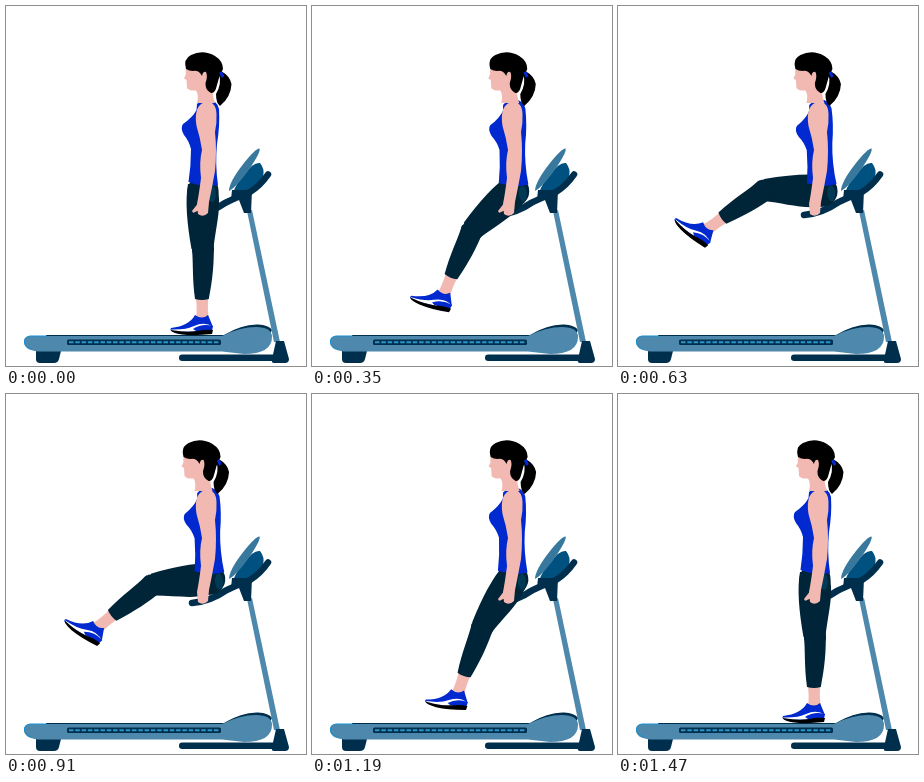
An HTML page that plays this animation: 300 px wide and 360 px high, repeating every 1.54 s.

```html
<!DOCTYPE html>
<html lang="en">
<head>
<meta charset="utf-8">
<title>Leg raise</title>
<style>
  html, body { margin: 0; width: 100%; height: 100%; overflow: hidden; background: #fff; }
  svg { display: block; width: 100vw; height: 100vh; }
  .skin { fill: #f1b9b1; }
  .pants { fill: #002438; }
  .blue { fill: #0029cf; }
  .dark { fill: #002f4d; }
  .steel { fill: #4e89ad; }
</style>
</head>
<body>
<svg viewBox="0 0 300 360">
  <!-- treadmill -->
  <g>
    <path class="dark" d="M30 345H55L53 353Q52 357 48 357H34Q30 357 30 353Z"/>
    <path class="dark" d="M40 329H218Q236 318 252 318.500Q263 319 266 324L262 332H40Z"/>
    <path class="steel" d="M24 330H216Q234 321 250 321Q266 321 266 331Q266 348 238 348L216 345.500H32Q18 344 18 336Q18 330 24 330Z"/>
    <path d="M41 330H24Q18 331 18.500 336Q19 341 26 343" fill="none" stroke="#168fce" stroke-width="1"/>
    <rect class="dark" x="61" y="333.500" width="154" height="5.500" rx="1.500"/>
    <path d="M63 336.300H214" stroke="#2b94c9" stroke-width="2" stroke-dasharray="4.500 1.800"/>
    <rect class="dark" x="173" y="348.500" width="100" height="6.500" rx="3.200"/>
    <path class="steel" d="M241 205L246 204L274 336H268Z"/>
    <path class="dark" d="M270 335H278L283 353Q283 357 279 357H268Q265 357 266 353Z"/>
    <path d="M227 187Q230 177 239 168Q247 156 254 157Q259 163 257 171L244 188Z" fill="#005080"/>
    <path class="dark" d="M226 184H246L245 207H238L233 194H225Z"/>
    <path d="M186 209Q205 207 219 197Q229 192 244 186Q254 180 262 168.500" fill="none" stroke="#002f4d" stroke-width="6.500" stroke-linecap="round"/>
    <path d="M223 185Q223 176 238 157Q250 142 253.500 142.500Q255 145 246 159Q232 180 223 185Z" fill="#38789d"/>
  </g>

  <g id="body">
    <g id="thigh">
      <circle class="pants" r="15.500"/>
      <path class="pants" d="M-15 -7C-18 10 -16 32 -11.500 58H10.500C12 40 18 20 15.500 2L14 -7Z"/>
      <g id="shin">
        <path class="skin" d="M-7.500 46H5.500Q4 60 6 70H-7Q-5.500 60 -7.500 46Z"/>
        <circle class="pants" r="11"/>
        <path class="pants" d="M-11.200 -2C-9.500 14 -11 28 -8 50Q-1 52 5.800 50C8 38 11 22 10.800 0Z"/>
        <g id="shoe">
          <path class="blue" d="M-31 10Q-13 8 -7 -3Q0 2 6 -3L11 9Q11 13 4 14L-28 14Q-33 13 -31 10Z"/>
          <path d="M-31 11.500Q-16 12 -8 8Q3 3 11 9V13L-28 14Z" fill="#fff"/>
          <path class="blue" d="M-9 11Q0 5 11 8L10 13H-6Z"/>
          <path d="M-31 12Q-15 15 -5 13Q4 11 11 12L10 16Q-8 18 -20 16.500Q-30 15 -31 12Z"/>
        </g>
      </g>
    </g>
    <ellipse cx="206" cy="188" rx="4" ry="8" fill="#003a55"/>
    <path class="blue" d="M191 98Q196 93.500 202 93.500Q211 94 213 103Q214 120 211 138Q209 158 212 179Q198 182 182.500 176Q185 160 185 143Q183 135 178 129Q174 122 177 118Q187 111 190.500 104Z"/>
  </g>

  <g id="head">
    <path d="M215 65Q224 70 225.500 78Q225 91 214 100Q210 97 210 88Q216 78 213 68Z"/>
    <path class="skin" d="M181 60Q179 66 180 68L178 72.500L180.500 74L181 82Q183 85 190 84.500Q193 89 191 97H209Q206 89 207 84L204 60Z"/>
    <path d="M180 63Q177 53 185 49Q197 43 209 50Q217 55 217 63Q213 70 211 79Q209 88 205 87Q199 84 199.500 77Q202 70 200 66Q197 65 196 70Q193 64 187 65Q183 65 180 63Z"/>
    <path d="M214.500 66L217 71" stroke="#0029cf" stroke-width="3"/>
  </g>

  <!-- arm -->
  <path class="skin" d="M201 95.500Q210 96 210.500 108Q211 117 209 126Q211 145 209 165Q206 182 203 196L202 207Q197 212 192 208L191 198Q193 188 195 172Q193 156 196 144Q194 131 190.500 120Q187 98 201 95.500Z"/>
  <path id="thumb" class="skin" d="M193 196L186 205Q187 208 189 206L194 204Z"/>
</svg>
<script>
  const STEP = 70, STEPS = 22;
  const [body, thigh, shin, shoe, head, thumb] =
    ["body", "thigh", "shin", "shoe", "head", "thumb"].map(id => document.getElementById(id));

  const place = (part, x, y, angle) =>
    part.setAttribute("transform", `translate(${x} ${y}) rotate(${angle})`);

  function draw() {
    const step = Math.floor(performance.now() / STEP) % STEPS;
    const rising = step <= 10;
    const phase = rising ? step : STEPS - 1 - step;
    const lift = (1 - Math.cos(Math.PI * phase / 10)) / 2;

    // The knee and foot lag a little on the way up.
    const thighAngle = 93 * lift;
    const shinAngle = 57 * lift ** (rising ? 1.3 : 1);
    const shoeAngle = 39 * lift ** (rising ? 1.35 : 1.75);
    const lean = lift ** 0.6;
    const tilt = 4.6 * lean;

    body.setAttribute("transform", `rotate(${-tilt} 203 96)`);
    place(thigh, 197, 185, thighAngle + tilt);
    place(shin, 0, 58, shinAngle - thighAngle);
    place(shoe, -1, 69, shoeAngle - shinAngle);
    place(head, -2.6 * lean, 0, 0);
    thumb.style.display = lift > 0.8 ? "none" : "";
    requestAnimationFrame(draw);
  }
  draw();
</script>
</body>
</html>
```
